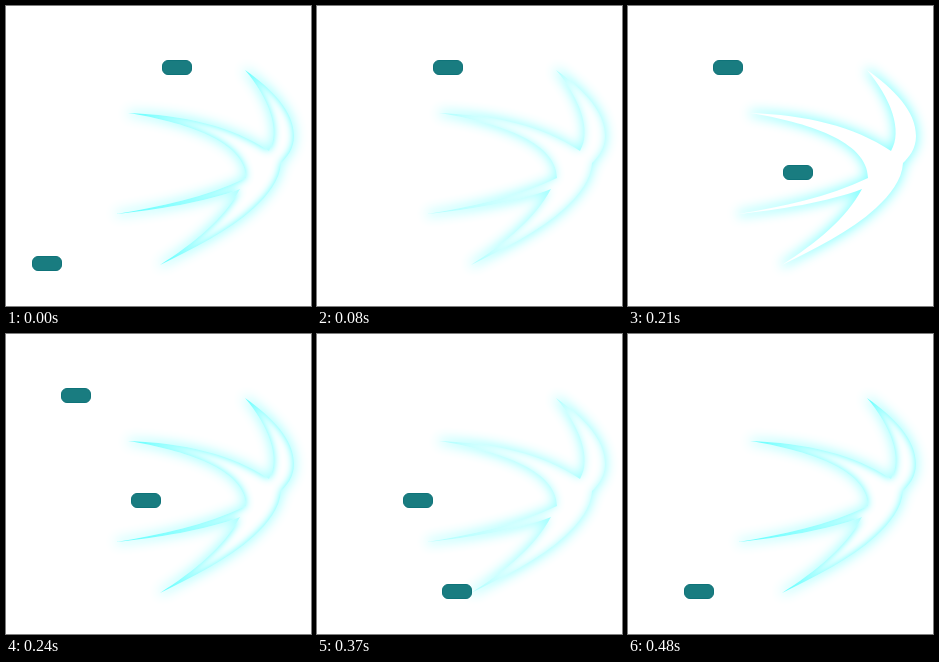
An HTML page that plays this animation: 305 px wide and 300 px high, repeating every 0.56 s.

```html
<!DOCTYPE html>
<html lang="en">
<head>
<meta charset="utf-8">
<title>Swallow in flight</title>
<style>
  html, body { margin: 0; width: 100%; height: 100%; overflow: hidden; background: #fff; }
  svg { display: block; width: 100vw; height: 100vh; }
</style>
</head>
<body>
<svg viewBox="0 0 305 300">
  <defs>
    <path id="bird" d="M239 64 C266 83 288 105 288 130 C288 143 281 151 275 157
      C274 174 262 189 248 202 C222 226 186 243 154 259
      C188 237 218 213 234 183 C200 196 150 204 110 208
      C154 201 200 191 240 172 C240 135 178 116 122 107
      C178 109 226 120 263 145 C275 125 263 92 239 64 Z"/>
    <clipPath id="inside"><use href="#bird"/></clipPath>
    <mask id="outside" maskUnits="userSpaceOnUse" x="-40" y="-40" width="385" height="380">
      <rect x="-40" y="-40" width="385" height="380" fill="#fff"/>
      <use href="#bird"/>
    </mask>
    <filter id="wide" filterUnits="userSpaceOnUse" x="-40" y="-40" width="385" height="380" color-interpolation-filters="sRGB">
      <feGaussianBlur stdDeviation="6"/>
    </filter>
    <filter id="soft" filterUnits="userSpaceOnUse" x="-40" y="-40" width="385" height="380" color-interpolation-filters="sRGB">
      <feGaussianBlur stdDeviation="4"/>
    </filter>
  </defs>
  <use id="halo" href="#bird" fill="#3ff" stroke="#3ff" stroke-width="4" filter="url(#wide)"/>
  <use href="#bird" fill="#fff"/>
  <!-- Inner glow: the blurred surroundings, seen only inside the bird -->
  <g id="rim" clip-path="url(#inside)">
    <g filter="url(#soft)">
      <rect x="-40" y="-40" width="385" height="380" fill="#3ff" mask="url(#outside)"/>
    </g>
  </g>
  <g id="dashes" fill="#197c80" stroke="#0f7379"></g>
</svg>
<script>
  const STEP = 80, STEPS = 7;
  const rim = document.getElementById('rim');
  const halo = document.getElementById('halo');
  const dashes = document.getElementById('dashes');

  // Glow strength for each step of its three-step pulse
  const rimPulse = [0.8, 0.4, 0];
  const haloPulse = [0.4, 0.46, 0.58];

  // Each dash jumps left through its stops, beginning at its own step
  const rows = [
    { y: 54, start: 0, stops: [156, 116, 85, 55] },
    { y: 159, start: 2, stops: [155, 125, 86, 56] },
    { y: 250, start: 4, stops: [125, 86, 56, 26] }
  ];

  for (const row of rows) {
    row.node = document.createElementNS('http://www.w3.org/2000/svg', 'rect');
    const shape = { y: row.y + 0.5, width: 29, height: 14, rx: 5.5 };
    for (const key in shape) row.node.setAttribute(key, shape[key]);
    dashes.append(row.node);
  }

  function draw(time) {
    const step = Math.floor(time / STEP) % STEPS;
    rim.setAttribute('opacity', rimPulse[step % 3]);
    halo.setAttribute('opacity', haloPulse[step % 3]);
    for (const { node, start, stops } of rows) {
      const x = stops[(step - start + STEPS) % STEPS];
      node.setAttribute('visibility', x === undefined ? 'hidden' : 'visible');
      if (x !== undefined) node.setAttribute('x', x + 0.5);
    }
  }

  const begin = performance.now();
  function tick() {
    draw(performance.now() - begin);
    requestAnimationFrame(tick);
  }
  tick();
</script>
</body>
</html>
```
